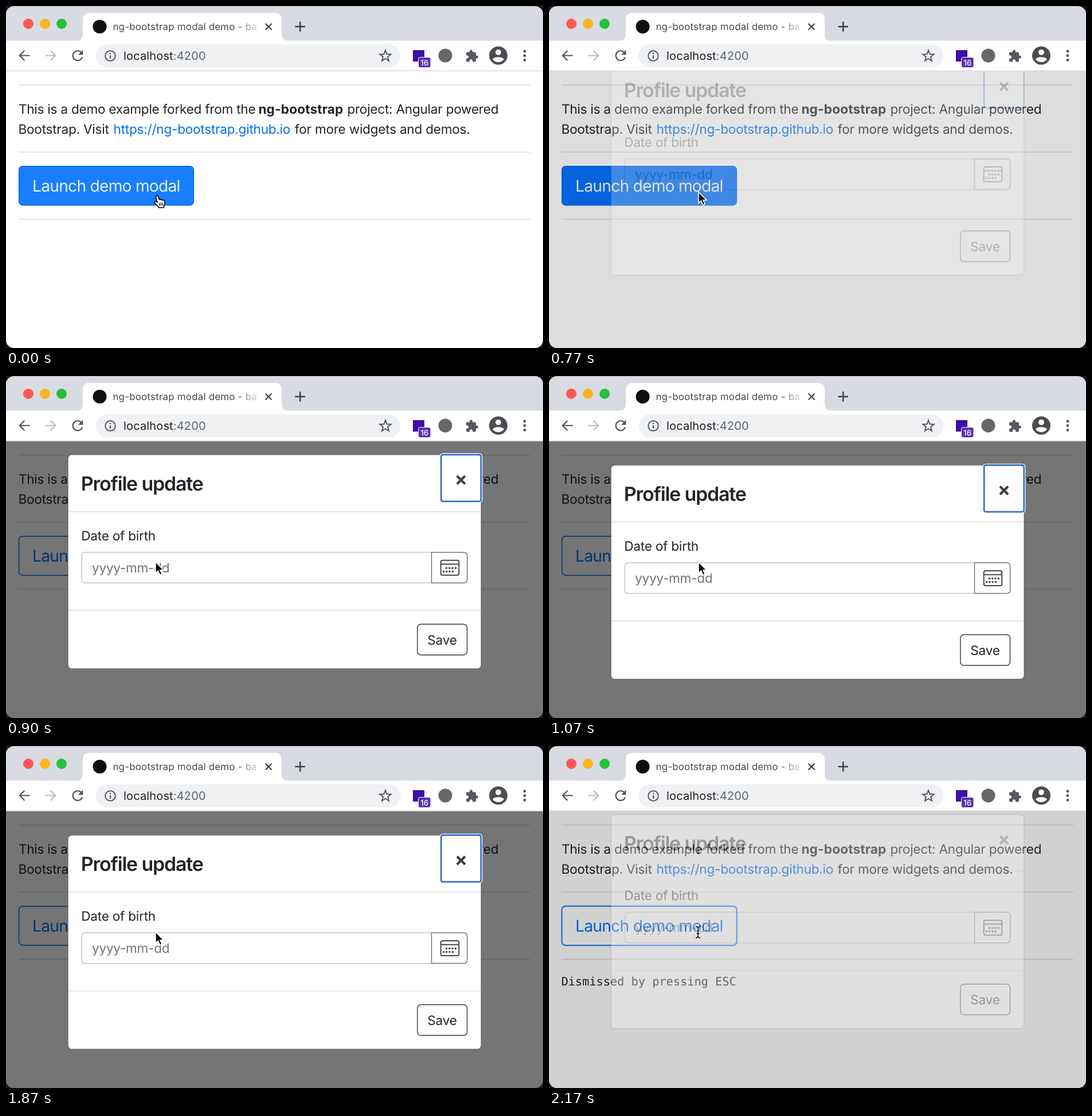
Animation, 937 px wide and 597 px high, one loop 2210 ms. Source, as an HTML page:

```html
<!DOCTYPE html>
<html lang="en">
<head>
<meta charset="utf-8">
<title>Modal demo</title>
<style>
  html, body { margin: 0; width: 100%; height: 100%; overflow: hidden; background: #1c1c1c; }
  svg { display: block; width: 937px; height: 597px; }
  text { font-family: Inter, "Open Sans", sans-serif; font-size: 22.6px; letter-spacing: -.25px; fill: #212529; white-space: pre; text-rendering: geometricPrecision; }
  .bold { font-weight: 700; letter-spacing: .15px; }
  .link { fill: #0070f0; }
  .big { font-size: 28.2px; letter-spacing: -.76px; }
  .title { font-size: 33.9px; font-weight: 600; letter-spacing: -1.15px; }
  .tab { font-size: 16.95px; letter-spacing: .2px; fill: url(#fade); }
  .url { font-size: 20px; letter-spacing: .15px; fill: #202124; }
  .mono { font-family: "DejaVu Sans Mono", monospace; font-size: 20.3px; letter-spacing: 0; }
  .badge { font-size: 13.5px; font-weight: 500; letter-spacing: 0; fill: #fff; text-anchor: middle; }
  .line { fill: none; stroke: #50545a; stroke-width: 2.2; }
  .rule { fill: none; stroke: #dedede; stroke-width: 1.46; }
  .box { fill: none; stroke-width: 1.46; }
</style>
</head>
<body>
<svg viewBox="0 0 937 597">
  <defs>
    <linearGradient id="fade" gradientUnits="userSpaceOnUse" x1="398" x2="442" y1="0" y2="0">
      <stop offset="0" stop-color="#45494e"/>
      <stop offset="1" stop-color="#45494e" stop-opacity=".15"/>
    </linearGradient>
    <clipPath id="window"><rect y=".5" width="937" height="596.5" rx="14"/></clipPath>
    <clipPath id="view"><rect y="114" width="937" height="483"/></clipPath>
    <clipPath id="tabText"><rect x="180" y="14" width="258" height="44"/></clipPath>
    <path id="beamShape" d="M256 315Q260 315 260 319V331Q260 335 256 335M264 315Q260 315 260 319V331Q260 335 264 335M257.5 327.5H262.5"/>
  </defs>

  <g clip-path="url(#window)">
    <rect width="937" height="597" fill="#fff"/>

    <!-- browser bar -->
    <rect width="937" height="60.5" fill="#d9dbe2"/>
    <circle cx="39" cy="31" r="9" fill="#fc5753"/>
    <circle cx="68" cy="31" r="9" fill="#fdb324"/>
    <circle cx="97" cy="31" r="9" fill="#25c03c"/>
    <path d="M122 61Q134 61 134 48V24Q134 12 146 12H469Q481 12 481 24V48Q481 61 493 61Z" fill="#fff"/>
    <circle cx="163.5" cy="36" r="12" fill="#0f0f10"/>
    <g clip-path="url(#tabText)"><text class="tab" x="186.4" y="42">ng-bootstrap modal demo - ba</text></g>
    <path class="line" d="M452.7 30.7l10.8 10.8m0-10.8l-10.8 10.8" style="stroke:#3c4043"/>
    <path class="line" d="M504.5 36h17.4M513.2 27.3v17.4" style="stroke:#3c4043;stroke-width:2.5"/>
    <path class="line" d="M41.5 86.5H24M32.3 78L23.8 86.5L32.3 95"/>
    <path class="line" d="M68.5 86.5H86M77.7 78L86.2 86.5L77.7 95" style="stroke:#b9bbbe"/>
    <path class="line" d="M131.5 81.3A8.4 8.4 0 1 0 133 89.3"/>
    <path d="M134.3 76.8V85.2H125.9Z" fill="#50545a"/>
    <rect x="156.5" y="67" width="532" height="40" rx="20" fill="#eff1f3"/>
    <circle class="line" cx="182" cy="87" r="8.8" style="stroke-width:1.9"/>
    <path class="line" d="M182 86v5.8M182 81.7v2.4"/>
    <text class="url" x="205" y="94">localhost<tspan fill="#5f6368">:4200</tspan></text>
    <path id="star" class="line" style="stroke-width:1.9"/>
    <rect x="710" y="77" width="20" height="20" fill="#3d0fa5"/>
    <rect x="719.5" y="89.5" width="21.5" height="18" rx="3" fill="#5a2fb4" stroke="#fff"/>
    <text class="badge" x="730.2" y="103.5">16</text>
    <circle cx="766.5" cy="86.5" r="12" fill="#66676b"/>
    <path transform="translate(801 75.5)" fill="#55585e" d="M20.5 11H19V7c0-1.1-.9-2-2-2h-4V3.5C13 2.12 11.88 1 10.5 1S8 2.12 8 3.5V5H4c-1.1 0-2 .9-2 2v3.8h1.5c1.49 0 2.7 1.21 2.7 2.7s-1.21 2.7-2.7 2.7H2V20c0 1.1.9 2 2 2h3.8v-1.5c0-1.49 1.21-2.7 2.7-2.7s2.7 1.21 2.7 2.7V22H17c1.1 0 2-.9 2-2v-4h1.5c1.38 0 2.5-1.12 2.5-2.5S21.88 11 20.5 11z"/>
    <circle cx="859" cy="86.5" r="16" fill="#4c4d52"/>
    <circle cx="859" cy="80.8" r="4.9" fill="#fff"/>
    <path d="M849.2 93.3C850.5 87.8 867.5 87.8 868.8 93.3C864.5 99.6 853.5 99.6 849.2 93.3Z" fill="#fff"/>
    <g fill="#50545a"><circle cx="905" cy="79" r="2.4"/><circle cx="905" cy="86.7" r="2.4"/><circle cx="905" cy="94.4" r="2.4"/></g>
    <path class="rule" d="M0 113.3H937" style="stroke:#d9dadc"/>

    <!-- page -->
    <g clip-path="url(#view)">
      <path class="rule" d="M22 138H915M22 255H915M22 372.3H915"/>
      <text x="21.9" y="188">This is a demo example forked from the</text>
      <text class="bold" x="440.4" y="188">ng-bootstrap</text>
      <text x="595.4" y="188">project: Angular powered</text>
      <text x="21.5" y="223">Bootstrap. Visit</text>
      <text class="link" x="187.6" y="223">https://ng-bootstrap.github.io</text>
      <text x="503.8" y="223">for more widgets and demos.</text>

      <rect id="fill" class="box" x="22.6" y="279.7" width="304.8" height="68" rx="6.3" style="fill:#0070ff" stroke="#0068ee"/>
      <rect id="ring" class="box" x="21.4" y="278.5" width="307.2" height="70.4" rx="7.5" stroke="#0070ff" stroke-opacity=".35"/>
      <text id="label" class="big" x="46" y="324">Launch demo modal</text>
      <text id="result" class="mono" x="21.4" y="418">Dismissed by pressing ESC</text>

      <rect id="shade" y="114" width="937" height="483"/>

      <g id="modal">
        <rect x="108.3" y="155.7" width="720.6" height="373.4" rx="6.5" fill="#fff" stroke="#000" stroke-opacity=".25" stroke-width="1.46"/>
        <path class="rule" d="M109 255H828.3M109 427.5H828.3"/>
        <text class="title" x="130.7" y="218.3">Profile update</text>
        <path id="cross" d="M787 192.8L801 206.8M801 192.8L787 206.8" stroke="#000" stroke-width="4.2"/>
        <g id="focus" fill="none">
          <rect x="757.3" y="153.8" width="73.4" height="85.2" rx="5" stroke="#fff" stroke-width="1.4"/>
          <rect x="759.2" y="155.7" width="69.6" height="81.4" rx="3.2" stroke="#386fcf" stroke-width="2.8"/>
        </g>
        <text x="131.3" y="305">Date of birth</text>
        <path class="box" d="M742 326H138.5Q132.3 326 132.3 332.2V373.4Q132.3 379.6 138.5 379.6H742" stroke="#bfc4ca"/>
        <text x="150" y="361" style="fill:#6c757d">yyyy-mm-dd</text>
        <path class="box" d="M742.5 326H798.5Q804.7 326 804.7 332.2V373.4Q804.7 379.6 798.5 379.6H742.5Z" stroke="#6c757d"/>
        <rect class="line" x="758.7" y="340" width="31.6" height="26" rx="3" style="stroke:#454a50;stroke-width:2"/>
        <path d="M758.7 346.7H790.3" stroke="#454a50" stroke-width="2"/>
        <g id="days" fill="#454a50"></g>
        <rect class="box" x="717.9" y="451.6" width="86.6" height="53.6" rx="6" stroke="#343a40"/>
        <text x="761" y="487" text-anchor="middle">Save</text>
      </g>

      <g id="hand">
        <path d="M5.2 2.4C6.6 1.4 8 2 8.5 3.4L10.6 9C11.5 8 13.2 8.2 13.7 9.4C14.8 8.7 16.2 9 16.7 10.3C18 9.8 19.5 10.4 19.8 12C20.3 14.5 20 16.5 19.2 18.5L18 23H9.5C8.5 20.5 5.5 18 3 15.5C1 13.3 2.2 11.5 4.2 12.2L7 14L4.6 5C4.3 4 4.4 3 5.2 2.4Z" fill="#fff" stroke="#000" stroke-width="1.6" stroke-linejoin="round"/>
        <path d="M11.3 14.5v5M13.9 14.5v5M16.5 14.5v5" stroke="#000" stroke-width="1.2"/>
      </g>
      <path id="arrow" transform="translate(261 324.6)" d="M0 0V19.5L4.4 15.4L7.6 22.8L11 21.3L7.9 14.1H13.8Z" fill="#000" stroke="#fff" stroke-width="1.6"/>
      <g id="beam" fill="none">
        <use href="#beamShape" stroke="#fff" stroke-width="3" stroke-opacity=".55"/>
        <use href="#beamShape" stroke="#000" stroke-width="1.5"/>
      </g>
    </g>
  </g>
</svg>

<script>
const LOOP = 2210, STEP = 1000 / 30, LAST = 65;
const OPEN = 731, LEAVE = 752, CLOSE = 2066;
const SLIDE = 73, BLUE = [0, 112, 255];
const el = id => document.getElementById(id);
const clamp = v => Math.min(1, Math.max(0, v));
const show = (id, on) => el(id).setAttribute('visibility', on ? 'visible' : 'hidden');
const set = (id, name, value) => el(id).setAttribute(name, value);

// Eased progress for a cubic curve with control points (x1, 0) and (x2, 1)
function ease(x, x1, x2) {
  let lo = 0, hi = 1, s = 0.5;
  for (let i = 0; i < 24; i++) {
    s = (lo + hi) / 2;
    const r = 1 - s;
    if (3 * r * r * s * x1 + 3 * r * s * s * x2 + s * s * s < x) lo = s; else hi = s;
  }
  return s * s * (3 - 2 * s);
}
const easeOut = x => ease(clamp(x), 0, 0.58);
const easeInOut = x => ease(clamp(x), 0.42, 0.58);

function buildIcons() {
  let star = '';
  for (let i = 0; i < 10; i++) {
    const r = i % 2 ? 4.3 : 10.2, a = (i / 5 - 0.5) * Math.PI;
    star += (i ? 'L' : 'M') + (662 + r * Math.cos(a)).toFixed(2) + ' ' + (87.5 + r * Math.sin(a)).toFixed(2);
  }
  set('star', 'd', star + 'Z');

  let dots = '';
  for (let i = 0; i < 8; i++) {
    const row = i >> 2;
    dots += `<circle cx="${768.5 - row * 5 + (i % 4) * 5.3}" cy="${353.5 + row * 6}" r="1.8"/>`;
  }
  el('days').innerHTML = dots;
}

function draw(t) {
  const closing = t >= CLOSE;
  const open = closing ? 1 - clamp((t - CLOSE) / 150) : clamp((t - OPEN) / 150);
  const lift = closing ? easeOut((t - CLOSE) / 300) : 1 - easeOut((t - OPEN) / 300);
  set('modal', 'opacity', open);
  set('modal', 'transform', `translate(0 ${-SLIDE * lift})`);
  set('shade', 'opacity', 1 - Math.pow(1 - open / 2, 1.12));

  const hover = t < LEAVE ? easeInOut((t + 117) / 150) : 1 - easeInOut((t - LEAVE) / 150);
  set('fill', 'fill-opacity', hover);
  el('label').style.fill = `rgb(${BLUE.map(c => Math.round(c + (255 - c) * hover))})`;
  set('cross', 'opacity', closing ? 0.5 : 0.75);
  show('focus', !closing);
  show('ring', closing);
  show('result', closing);

  const move = 4 * easeOut(t / 430);
  set('hand', 'transform', `translate(${257 - move} ${329 - move})`);
  const typing = t >= CLOSE + 30;
  show('hand', t < OPEN);
  show('arrow', t >= OPEN && !typing);
  show('beam', typing);
}

function tick() {
  const t = performance.now() % LOOP;
  draw(Math.min(LAST, Math.floor((t + 3.4) / STEP)) * STEP);
  requestAnimationFrame(tick);
}

buildIcons();
draw(0);
requestAnimationFrame(tick);
</script>
</body>
</html>
```
